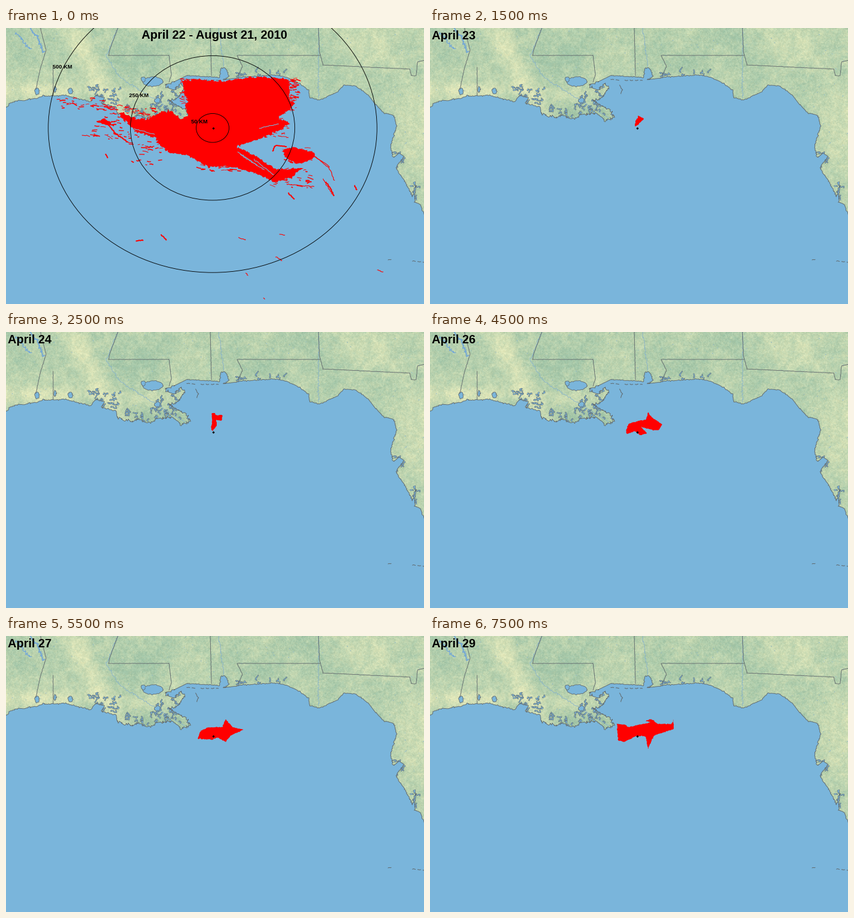
Write a matplotlib script that moves like this. It is 700 px wide and 463 px high and loops after 8 s.

```python
import numpy as np
import matplotlib.pyplot as plt
from matplotlib.animation import FuncAnimation
from matplotlib.collections import LineCollection
from matplotlib.patches import Ellipse, PathPatch
from matplotlib.path import Path

W, H, DPI = 700, 463, 64
PX = 72 / DPI
SEA, COAST, RED = "#7ab5db", "#60686c", "#ff0000"
RIVER = "#86b2cb"
rng = np.random.default_rng(22)

fig = plt.figure(figsize=(W / DPI, H / DPI), dpi=DPI, facecolor=SEA)
ax = fig.add_axes([0, 0, 1, 1])
ax.set_xlim(0, W)
ax.set_ylim(H, 0)
ax.axis("off")


def ragged(flat, jitter, closed=False):
    """Resample a polyline finely and roughen it."""
    p = np.array(flat, float).reshape(-1, 2)
    if closed:
        p = np.vstack([p, p[:1]])
    d = np.r_[0, np.cumsum(np.hypot(*np.diff(p, axis=0).T))]
    t = np.r_[np.arange(0, d[-1], 1.8), d[-1]]
    path = np.column_stack([np.interp(t, d, p[:, k]) for k in (0, 1)])
    return path + rng.normal(0, 1, path.shape) * jitter


def line(flat, color, width, jitter, z=3):
    p = ragged(flat, jitter)
    art, = ax.plot(*p.T, color=color, lw=width * PX, zorder=z)
    return art


# ---- coastline, west to east ----
west = [-5, 138, 6, 127, 18, 122, 46, 119, 62, 114, 100, 113, 142, 124,
        150, 113, 165, 117, 160, 126, 184, 132, 187, 143]
delta = [187, 143, 210, 150, 224, 147, 238, 153, 252, 146, 270, 142, 286, 148,
         292, 156, 310, 149, 300, 137, 272, 122, 287, 118, 300, 100, 292, 93,
         280, 104, 266, 97, 281, 89]
north = [303, 80, 327, 81, 358, 83, 360, 67, 369, 68, 373, 81, 364, 87,
         400, 82, 446, 79, 465, 81, 490, 92, 507, 105, 508, 117, 526, 121,
         555, 107, 565, 96, 585, 97, 606, 112]
florida = [619, 128, 632, 142, 650, 147, 654, 165, 644, 199, 649, 218,
           657, 210, 667, 215, 653, 234, 673, 266, 681, 283, 686, 264,
           684, 291, 694, 296, 701, 316]
coast = np.vstack([ragged(west, .6), ragged(delta, 1.2), ragged(north, .5),
                   ragged(florida, .7)])
land = Path(np.vstack([coast, [(W + 9, 316), (W + 9, -9), (-9, -9), (-9, 138)]]))


# ---- land cover ----
def field(cell):
    g = rng.random((H // cell + 2, W // cell + 2))
    y, x = np.arange(H) / cell, np.arange(W) / cell
    i, j = y.astype(int), x.astype(int)
    fy, fx = (y - i)[:, None], x - j
    rows = g[i] * (1 - fy) + g[i + 1] * fy
    return rows[:, j] * (1 - fx) + rows[:, j + 1] * fx - 0.5


yy, xx = np.mgrid[:H, :W]


def bump(cx, cy, rx, ry):
    return np.exp(-((xx - cx) / rx) ** 2 - ((yy - cy) / ry) ** 2)


valley = np.exp(-((xx - 108 - 0.55 * yy) / 24) ** 2)
dry = 0.28 + 0.5 * valley + 0.5 * bump(60, 105, 90, 14)
dry += 0.35 * bump(610, 15, 80, 45) + 0.35 * bump(690, 200, 45, 110)
dry += 0.3 * bump(235, 115, 45, 16)
for cell in (48, 19, 8, 3, 1):
    dry += 0.28 * field(cell)
dry = np.clip(dry, 0, 1)[..., None]
green, yellow = np.array([160, 196, 167]), np.array([228, 233, 187])
rgb = green + (yellow - green) * dry + 14 * field(2)[..., None]
terrain = ax.imshow(rgb.astype(np.uint8), extent=(0, W, H, 0), zorder=1,
                    interpolation="nearest", aspect="auto")
terrain.set_clip_path(land, ax.transData)

# ---- inland water ----
for cx, cy, rx, ry in ((246, 90, 17, 8), (230, 86, 4, 4), (52, 106, 4, 6),
                       (82, 103, 2, 5), (108, 106, 4, 5), (254, 122, 5, 5)):
    a = np.linspace(0, 2 * np.pi, 20)
    rim = ragged(np.column_stack([cx + rx * np.cos(a), cy + ry * np.sin(a)]), .5)
    ax.add_patch(PathPatch(Path(rim), fc=SEA, ec=COAST, lw=.8 * PX, zorder=3))

line([38, -2, 53, 16, 63, 40], "#76a9d4", 2, 1.2, 2)
line([15, 8, 42, 36], "#76a9d4", 1.4, 1.2, 2)
for flat in ([187, 0, 168, 48, 192, 84, 298, 150], [365, 65, 356, 0],
             [524, 0, 523, 116]):
    line(flat, RIVER, .8, .8, 2)

# scribbled inlets in boxes x0, x1, y0, y1
for x0, x1, y0, y1 in ((196, 262, 128, 149), (262, 306, 136, 153),
                       (276, 302, 94, 120), (250, 284, 108, 134),
                       (140, 190, 98, 132), (388, 396, 70, 80),
                       (404, 472, 75, 78), (648, 668, 207, 230),
                       (677, 689, 262, 292)):
    for _ in range(4 + (x1 - x0) * (y1 - y0) // 75):
        start = rng.uniform(x0, x1), rng.uniform(y0, y1)
        walk = start + np.cumsum(rng.normal(0, 1.6, (6, 2)), 0)
        for color, width in ((COAST, 2), (SEA, .9)):
            art, = ax.plot(*walk.T, color=color, lw=width * PX, zorder=3)
            art.set_clip_path(land, ax.transData)

ponds = rng.uniform((0, 0), (W, 280), (260, 2))
dots = ax.scatter(*ponds.T, s=rng.uniform(.5, 3, 260), c=RIVER, lw=0, zorder=2)
dots.set_clip_path(land, ax.transData)
ax.plot(*coast.T, color=COAST, lw=.9 * PX, zorder=3)

# ---- islands and state lines ----
for flat in ([302, 86, 319, 88], [326, 88, 356, 88], [639, 389, 646, 388],
             [680, 391, 700, 393]):
    line(flat, COAST, 1, .3).set_linestyle((0, (6, 3)))
line([318, 96, 322, 104, 319, 110], COAST, 1, .3)

for flat in ([57, -2, 67, 37, 57, 70, 50, 103], [79, 66, 79, 113],
             [188, -2, 174, 36, 172, 46], [172, 46, 273, 46],
             [273, 46, 277, 78, 273, 91], [342, -2, 344, 80],
             [389, 80, 396, 64, 387, 46], [387, 46, 526, 46],
             [523, -2, 525, 40, 531, 62], [531, 62, 676, 69],
             [676, 69, 679, 80, 687, 80, 689, 57, 701, 54]):
    line(flat, COAST, .9, .15)


# ---- slicks ----
def slick(flat, jitter=.4):
    shape = Path(ragged(flat, jitter, closed=True))
    return ax.add_patch(PathPatch(shape, fc=RED, lw=0, zorder=5))


scenes = [[] for _ in range(9)]
summary = scenes[0]

apr22 = [346, 168, 350, 170, 350, 165, 355, 165, 356, 160]
scenes[1].append(line(apr22, RED, 1.2, .2, 5))

apr23 = [343, 166, 344, 157, 349, 147, 358, 152, 351, 160]
scenes[2].append(slick(apr23))

apr24 = [345, 136, 350, 136, 352, 140, 363, 139, 361, 149, 352, 147,
         353, 156, 346, 166, 343, 163, 345, 152]
scenes[3].append(slick(apr24))

apr25 = [338, 165, 341, 156, 352, 147, 361, 136, 377, 151, 376, 157,
         360, 157, 354, 159, 350, 170]
scenes[4].append(slick(apr25))

apr26 = [328, 165, 333, 154, 345, 150, 361, 147, 366, 135, 370, 142, 389, 155,
         384, 164, 375, 165, 353, 159, 364, 170, 352, 173, 343, 166, 330, 171]
scenes[5].append(slick(apr26))

apr27 = [321, 172, 326, 159, 340, 153, 362, 153, 368, 140, 381, 154,
         398, 157, 376, 167, 368, 178, 354, 170, 345, 174]
scenes[6].append(slick(apr27))

apr28 = [318, 172, 320, 155, 327, 151, 322, 161, 345, 156, 373, 157, 372, 163,
         380, 160, 366, 145, 384, 155, 404, 157, 402, 161, 380, 170, 371, 183,
         352, 170, 347, 175]
scenes[7].append(slick(apr28))

apr29 = [313, 147, 328, 149, 331, 153, 369, 145, 361, 143, 369, 139, 382, 147,
         404, 148, 408, 140, 408, 156, 375, 167, 365, 189, 361, 168, 344, 168,
         325, 178, 315, 175]
scenes[8].append(slick(apr29))

# ---- cumulative slick ----
east = [298, 87, 325, 86, 360, 90, 425, 81, 474, 86, 475, 104, 474, 120,
        484, 126, 470, 140, 455, 152, 476, 160, 462, 169, 440, 180, 385, 199]
south = [422, 217, 450, 236, 467, 237, 495, 235, 480, 249, 450, 259, 417, 243,
         370, 231, 340, 234, 305, 214, 275, 210, 256, 195, 250, 184, 220, 175,
         197, 154, 187, 141]
shore = [215, 150, 238, 153, 262, 139, 276, 140, 292, 152, 305, 147, 300, 130,
         306, 122, 300, 112, 297, 98]
summary.append(slick(east + south + shore, 1.1))
summary.append(slick([464, 203, 482, 200, 513, 208, 519, 214, 500, 226,
                      486, 228, 468, 217], .9))
summary.append(slick([152, 157, 166, 152, 181, 164, 165, 162], .8))

# dashes along the edges: x0, x1, y0, y1, count
dashes, widths = [], []
for x0, x1, y0, y1, count in ((456, 490, 84, 140, 75), (294, 306, 85, 130, 30),
                              (88, 170, 118, 138, 34), (165, 250, 128, 160, 60),
                              (125, 250, 160, 188, 36), (205, 262, 185, 230, 28),
                              (320, 440, 230, 240, 34), (425, 475, 152, 184, 40),
                              (445, 512, 236, 268, 34), (462, 518, 200, 226, 18)):
    for _ in range(count):
        x, y = rng.uniform(x0, x1), rng.uniform(y0, y1)
        dx = rng.uniform(1, 5)
        dy = dx * rng.normal(.1, .2)
        dashes.append([(x - dx, y - dy), (x, y + rng.normal(0, .5)), (x + dx, y + dy)])
        widths.append(PX * rng.uniform(.7, 1.8))
summary.append(ax.add_collection(
    LineCollection(dashes, colors=RED, linewidths=widths, zorder=6)))

THICK = ([447, 206, 451, 197, 469, 199], [536, 259, 543, 268, 549, 281],
         [473, 278, 483, 287], [170, 160, 182, 176, 203, 191],
         [167, 212, 170, 218], [219, 357, 229, 356], [260, 347, 268, 355],
         [584, 264, 587, 271])
THIN = ([510, 211, 540, 231, 550, 256], [518, 216, 540, 234],
        [531, 253, 546, 279], [470, 262, 515, 266], [128, 180, 139, 181],
        [390, 352, 401, 355], [459, 346, 466, 348], [452, 384, 462, 390],
        [402, 411, 405, 415], [431, 453, 433, 455], [622, 406, 632, 409])
GAPS = ([392, 212, 432, 238], [388, 208, 420, 230], [415, 220, 448, 246],
        [425, 168, 456, 161], [214, 169, 248, 178])
for group, color, width in ((THICK, RED, 2), (THIN, RED, 1.1), (GAPS, SEA, 1.1)):
    summary += [line(flat, color, width, .4, 6) for flat in group]

for km in (50, 250, 500):
    ring = Ellipse((346, 167.7), km * 1.101, km * .97, fill=False, ec="black",
                   lw=.9 * PX, zorder=7)
    summary.append(ax.add_patch(ring))


def label(x, y, text, px):
    return ax.text(x, y, text, fontsize=px * PX, family="Liberation Sans",
                   weight="bold", color="black", va="baseline", zorder=9)


for x, y, km in ((77.5, 68, 500), (206.5, 115.5, 250), (310.5, 160.3, 50)):
    summary.append(label(x, y, f"{km} KM", 9.4))
summary.append(label(227, 18.5, "April 22 - August 21, 2010", 20.1))
date = label(3, 19, "", 20)
ax.plot(346.6, 168, marker="D", ms=3 * PX, color="black", mew=0, zorder=8)


def draw(i):
    day = (i + 1) // 2
    for k, scene in enumerate(scenes):
        for art in scene:
            art.set_visible(k == day)
    date.set_text(f"April {21 + day}" if day else "")
    return [date]


anim = FuncAnimation(fig, draw, frames=16, interval=500, repeat=True,
                     repeat_delay=0, blit=False)
plt.show()
```
